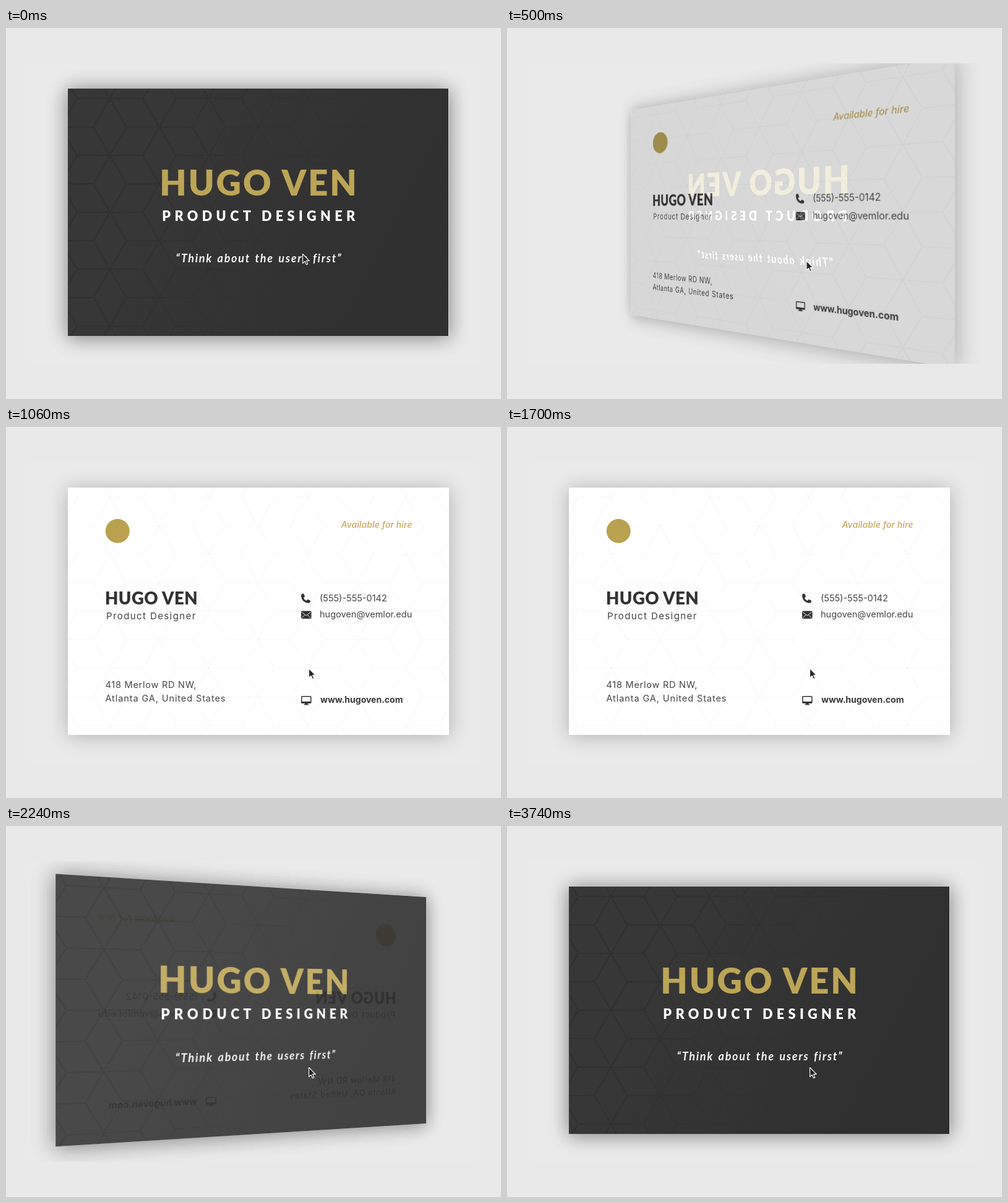
These frames come from a looping animation (800x600 px, 3760 ms). An HTML page:

```html
<!DOCTYPE html>
<html lang="en">
<head>
<meta charset="utf-8">
<title>Flipping business card</title>
<style>
  html, body { margin: 0; width: 100%; height: 100%; overflow: hidden; background: #e9e9e9; }
  #stage { position: absolute; left: 0; top: 0; width: 800px; height: 600px; overflow: hidden; }
  #view {
    position: absolute; left: 36px; top: 57px; width: 728px; height: 486px;
    overflow: hidden; background: #eaeaea;
    perspective: 864px; perspective-origin: 372.5px 241.5px;
  }
  .face {
    position: absolute; left: 64px; top: 41px; width: 616px; height: 400px;
    transform-origin: 308px 200px; overflow: visible;
    box-shadow: 0 2px 30px rgba(0, 0, 0, .25);
  }
  .face svg { display: block; }
  #back { background: #fff; }
  #front { width: 615px; }
  #cursor { position: absolute; left: 0; top: 0; overflow: visible; }
  .title { font-family: Lato, sans-serif; font-weight: 900; }
  .quote { font: italic 700 18px Lato, sans-serif; letter-spacing: 1.7px; word-spacing: 2px; }
  .info { font: 400 14.5px Inter, sans-serif; fill: #444; }
</style>
</head>
<body>
<div id="stage">
  <div id="view">
    <div class="face" id="back">
      <svg width="616" height="400" viewBox="100 98 616 400">
        <path class="grid" fill="none" stroke="#f8f8f8" stroke-width="1.2"/>
        <circle cx="180.3" cy="168.2" r="19.5" fill="#b9a150"/>
        <text class="info" x="541.5" y="162.7" style="font-size:14px;font-style:italic;font-weight:500;letter-spacing:.1px;fill:#c4a95c">Available for hire</text>
        <text class="title" x="160" y="286.5" font-size="27.5" letter-spacing=".5" fill="#333">HUGO VEN</text>
        <text class="info" x="162" y="311" style="font-size:15px;letter-spacing:1.4px">Product Designer</text>
        <text class="info" x="160.5" y="422" letter-spacing=".75">418 Merlow RD NW,</text>
        <text class="info" x="160.5" y="444" letter-spacing=".9">Atlanta GA, United States</text>
        <text class="info" x="507" y="282">(555)-555-0142</text>
        <text class="info" x="507" y="308">hugoven@vemlor.edu</text>
        <text class="info" x="508" y="446" style="font-size:14px;font-weight:700;fill:#383838">www.hugoven.com</text>
        <g fill="#333">
          <path d="M477 272 q0 -2 3 -2.5 q1.2 0 1.5 1 l1.3 3 q.3 1 -.6 1.7 l-1.4 1.2 q1.6 3 4.6 4.6 l1.2 -1.4 q.7 -.9 1.7 -.5 l3 1.3 q1 .4 .7 1.6 q-.6 2.8 -2.6 2.8 q-12 -.8 -12.4 -12.8z"/>
          <rect x="477" y="297.5" width="16.5" height="12.5" rx="1.5"/>
          <path d="M478 299.5 l7.2 5.5 7.2 -5.5 M478 309 l4.8 -5 M492.4 309 l-4.8 -5" fill="none" stroke="#fff" stroke-width=".9"/>
          <path fill-rule="evenodd" d="M478.5 435 h13.5 q1.5 0 1.5 1.5 v9 q0 1.5 -1.5 1.5 h-4.5 v1 h1.5 v1.5 h-7.5 v-1.5 h1.5 v-1 h-4.5 q-1.5 0 -1.5 -1.5 v-9 q0 -1.5 1.5 -1.5z M478.5 436.5 v7.5 h13.5 v-7.5z"/>
        </g>
      </svg>
    </div>
    <div class="face" id="front">
      <svg width="615" height="400" viewBox="100 98 615 400">
        <defs>
          <linearGradient id="shade" gradientUnits="userSpaceOnUse" x1="250" y1="200" x2="600" y2="380">
            <stop offset="0" stop-color="#373737"/>
            <stop offset="1" stop-color="#303030"/>
          </linearGradient>
          <linearGradient id="fade" gradientUnits="userSpaceOnUse" x1="200" y1="220" x2="560" y2="400">
            <stop offset="0" stop-color="#2c2c2c" stop-opacity=".6"/>
            <stop offset="1" stop-color="#2c2c2c" stop-opacity="0"/>
          </linearGradient>
        </defs>
        <rect x="100" y="98" width="615" height="400" fill="url(#shade)"/>
        <path class="grid" fill="none" stroke="url(#fade)" stroke-width="2.2"/>
        <g class="title" text-anchor="middle">
          <text x="409" y="270.5" font-size="56" letter-spacing="3" fill="#bda557">HUGO VEN</text>
          <text x="411.5" y="311.5" font-size="21.6" letter-spacing="6.4" fill="#fff">PRODUCT DESIGNER</text>
        </g>
        <text class="quote" x="408.8" y="378.5" text-anchor="middle" fill="#f6f6f6">“Think about the users first”</text>
      </svg>
    </div>
  </div>
  <svg id="cursor" width="800" height="600">
    <path id="arrow" d="M0 0 V15 L3.5 11.8 L5.9 17.3 L8.3 16.2 L6 10.9 H10.6 Z" fill="#262626" stroke="#fff" stroke-width="1.1" stroke-linejoin="round"/>
  </svg>
</div>
<script>
  const LOOP = 3760, STEP = 20, FLIP = 200, TO_BACK = 400, TO_FRONT = 2110;
  const byId = id => document.getElementById(id);
  const front = byId('front'), back = byId('back'), arrow = byId('arrow');
  const clamp = x => Math.min(1, Math.max(0, x));

  // cubic-bezier(.25, .1, .25, 1)
  function ease(x) {
    x = clamp(x);
    if (x === 0 || x === 1) return x;
    const curve = (a, b, u) => 3 * a * u * (1 - u) ** 2 + 3 * b * u * u * (1 - u) + u ** 3;
    let lo = 0, hi = 1;
    for (let i = 0; i < 30; i++) {
      const mid = (lo + hi) / 2;
      if (curve(.25, .25, mid) < x) lo = mid; else hi = mid;
    }
    return curve(.1, 1, lo);
  }

  // Six-spoked stars on a triangular lattice join into a pattern of cubes.
  function cubes() {
    const dx = 79.8, dy = 46, arm = 53.2;
    let d = '';
    for (let i = -1; i < 8; i++) {
      for (let j = -1; j < 6; j++) {
        const x = 168 + dx * i, y = 114 + dy * (2 * j + Math.abs(i % 2));
        for (const [u, v] of [[arm, 0], [arm / 2, dy], [arm / 2, -dy]]) {
          d += `M${x - u} ${y - v}L${x + u} ${y + v}`;
        }
      }
    }
    return d;
  }

  function draw(t) {
    const turned = ease((t - TO_BACK) / FLIP) - ease((t - TO_FRONT) / FLIP);
    const angle = 180 * (1 - turned);
    back.style.transform = `rotateY(${-angle}deg)`;
    front.style.transform = `rotateY(${180 - angle}deg)`;
    front.style.opacity = 1 - turned;
    const m = (1 - Math.cos(Math.PI * clamp((t - 80) / 900))) / 2;
    arrow.setAttribute('transform', `translate(${479.5 + 10 * m} ${365.5 + 25 * m})`);
  }

  const grid = cubes();
  document.querySelectorAll('.grid').forEach(p => p.setAttribute('d', grid));

  const start = performance.now();
  function tick() {
    const t = (performance.now() - start) % LOOP;
    draw(Math.floor(t / STEP) * STEP);
    requestAnimationFrame(tick);
  }
  draw(0);
  requestAnimationFrame(tick);
</script>
</body>
</html>
```
